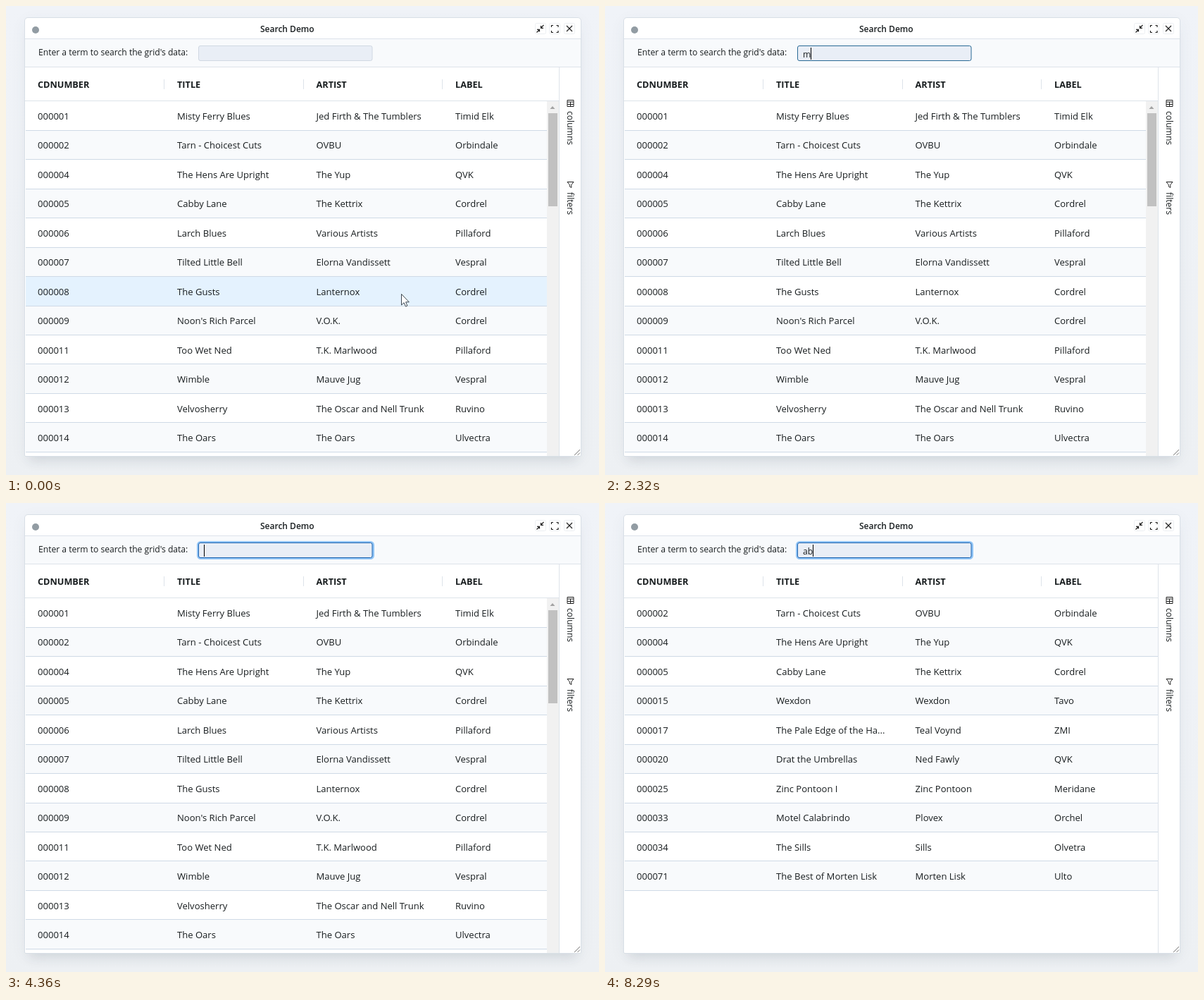
Write an HTML page that moves like this. It is 842 by 665 pixels and loops after 8370 ms.

```html
<!DOCTYPE html>
<html lang="en">
<head>
<meta charset="utf-8">
<title>Search Demo</title>
<style>
  html, body { margin: 0; width: 100%; height: 100%; overflow: hidden; }
  body { background: linear-gradient(#f0f3f8, #edf0f3); }
  .window {
    position: absolute; left: 26px; top: 16px; width: 789px; height: 621px;
    border: 1px solid #d8dfe6; border-radius: 5px 5px 2px 2px; background: #fff;
    box-shadow: 0 14px 14px -8px rgba(60, 75, 95, .11), 0 5px 22px rgba(60, 75, 95, .05);
  }
  svg { position: absolute; left: 0; top: 0; }
  text { font: 12.13px "Open Sans", "Noto Sans", sans-serif; fill: #181d1f; white-space: pre; }
  .title { font-weight: 600; font-size: 12px; }
  .head text { font-weight: 700; font-size: 12.7px; }
  #rows text { font-size: 13.05px; }
  .line { stroke: #dde3ea; fill: none; }
  .icon { stroke: #222; fill: none; stroke-width: 1.2; }
  .thin { stroke-width: 1; }
  .button { fill: #fff; stroke: #eceff2; }
</style>
</head>
<body>
<div class="window"></div>
<svg width="842" height="665" viewBox="0 0 842 665">
  <clipPath id="body"><rect x="27" y="135" width="758" height="503"/></clipPath>

  <rect x="27" y="47" width="789" height="39" fill="#f8fafc"/>
  <path class="line" d="M27 46.5H816M27 86.5H816M27 134.5H785M785.5 86V638"/>
  <circle cx="42" cy="34" r="5" fill="#929ca3"/>
  <text class="title" x="361" y="37">Search Demo</text>

  <rect class="button" x="751.5" y="24.5" width="15" height="15" rx="2"/>
  <rect class="button" x="771.5" y="24.5" width="15" height="15" rx="2"/>
  <rect class="button" x="792.5" y="24.5" width="15" height="15" rx="2"/>
  <path class="icon" d="M763.5 27 759.5 31M759.5 28V31.3H763M753.5 37.5 757.5 33.5M754 33.3H757.5V36.5"/>
  <path class="icon" d="M774.5 30V27.5H777M781.5 27.5H784V30M784 35V37.5H781.5M777 37.5H774.5V35"/>
  <path class="icon" d="M796 28 804 36M804 28 796 36"/>

  <text x="46" y="70">Enter a term to search the grid's data:</text>
  <rect id="ring" x="272.5" y="55.5" width="249" height="23" rx="4" fill="none" stroke="#92c5f6" stroke-width="3"/>
  <rect id="field" x="273.5" y="56.5" width="246.5" height="21" rx="2.5" fill="#e9eef6"/>
  <rect id="selection" x="281" y="59" height="18" fill="#1a73d8"/>
  <text id="term" x="281" y="73"></text>
  <rect id="caret" y="59" width="1" height="17"/>

  <g class="head">
    <text x="45" y="116">CDNUMBER</text>
    <text x="243" y="116">TITLE</text>
    <text x="440.5" y="116">ARTIST</text>
    <text x="638" y="116">LABEL</text>
    <path class="line" d="M224.5 104V118M422.5 104V118M619.5 104V118"/>
  </g>

  <g clip-path="url(#body)">
    <g id="rows"></g>
    <g id="scrollbar">
      <rect x="768" y="135" width="17" height="503" fill="#f1f1f1"/>
      <rect x="770" y="152" width="13" height="132" fill="#c1c1c1"/>
      <path d="M772.5 146 776 142 779.5 146Z" fill="#a3a3a3"/>
    </g>
  </g>

  <path class="icon thin" d="M797 133.5H806V142.5H797ZM797 136H806M797 139.5H806M801.5 136V142"/>
  <text transform="translate(797 149) rotate(90)">columns</text>
  <path class="icon thin" d="M797 249.5H806L802.8 253.5V257.5L800.3 256V253.5Z"/>
  <text transform="translate(797 264) rotate(90)">filters</text>
  <path class="icon thin" style="stroke:#777" d="M807 637 815 629M811.5 637 815 633.5"/>

  <path id="pointer" d="M0 0V15.5L3.6 12.2 6 17.6 8.4 16.5 6.1 11.3H10.8Z" fill="#fff" stroke="#3c4650"/>
</svg>

<script>
const LOOP = 8370, TOP = 134.9, PITCH = 41.45;
const COLUMNS = [45, 243, 440.5, 638];
const $ = id => document.getElementById(id);

const records = Object.fromEntries(`
000001|Misty Ferry Blues|Jed Firth & The Tumblers|Timid Elk
000002|Tarn - Choicest Cuts|OVBU|Orbindale
000004|The Hens Are Upright|The Yup|QVK
000005|Cabby Lane|The Kettrix|Cordrel
000006|Larch Blues|Various Artists|Pillaford
000007|Tilted Little Bell|Elorna Vandissett|Vespral
000008|The Gusts|Lanternox|Cordrel
000009|Noon's Rich Parcel|V.O.K.|Cordrel
000011|Too Wet Ned|T.K. Marlwood|Pillaford
000012|Wimble|Mauve Jug|Vespral
000013|Velvosherry|The Oscar and Nell Trunk|Ruvino
000014|The Oars|The Oars|Ulvectra
000015|Wexdon|Wexdon|Tavo
000017|The Pale Edge of the Ha...|Teal Voynd|ZMI
000020|Drat the Umbrellas|Ned Fawly|QVK
000021|Vermeil Mists|Dwain Corbley|Plumb Studios
000025|Zinc Pontoon I|Zinc Pontoon|Meridane
000033|Motel Calabrindo|Plovex|Orchel
000034|The Sills|Sills|Olvetra
000041|Wouldn't Trust the Lad...|Corbin Lee Tarvin|ZMI
000071|The Best of Morten Lisk|Morten Lisk|Ulto`
  .trim().split("\n").map(line => [+line.slice(0, 6), line.split("|")]));

const views = {
  all: [1, 2, 4, 5, 6, 7, 8, 9, 11, 12, 13, 14, 15],
  mi: [1, 17, 21, 41],
  mis: [1, 21],
  ab: [2, 4, 5, 15, 17, 20, 25, 33, 34, 71]
};

// Cue lists: [start in ms, ...values]; each cue holds until the next one.
const pointerCues = [
  [0, 561, 408], [90, 528, 402], [170, 472, 389], [250, 421, 373], [330, 377, 355],
  [400, 352, 322], [480, 337, 278], [560, 327, 230], [630, 320, 184], [710, 316, 145],
  [790, 314, 116], [860, 313, 94], [950, null, null]
];
const viewCues = [
  [0, "all"], [2550, "mi", [0, 1, 1, 0]], [2630, "mi"], [2880, "mis"], [4360, "all"], [6240, "ab"]
];
const termCues = [
  [0, ""], [2320, "m"], [2470, "mi"], [2790, "mis"], [4190, ""], [5760, "a"], [6170, "ab"]
];
const caretCues = [
  [0, false], [950, true], [1260, false], [1750, true], [3360, false], [4190, true],
  [4760, false], [5260, true], [6650, false], [7230, true], [7710, false], [8290, true]
];
const fieldCues = [[0, "#d0d8e2"], [950, "#7fa3c4"], [1030, "#2a6a96"], [2470, "#1b62ae"]];
const ringCues = [[0, 0], [2400, 0.5], [2470, 1]];

const cueAt = (cues, t) => cues.findLast(cue => cue[0] <= t).slice(1);
const show = (node, on) => node.setAttribute("visibility", on ? "visible" : "hidden");
const escapeText = s => s.replace(/&/g, "&amp;");
const edge = i => Math.floor(TOP + i * PITCH);

function rowMarkup(id, i, width, fill) {
  const top = edge(i) + 1, bottom = edge(i + 1);
  const baseline = Math.round(161 + i * PITCH);
  const cells = records[id].map((s, c) =>
    `<text x="${COLUMNS[c]}" y="${baseline}">${escapeText(s)}</text>`).join("");
  return `<rect x="28" y="${top}" width="${width}" height="${bottom - top}" fill="${fill}"/>
    <rect x="28" y="${bottom}" width="${width}" height="1" fill="#cfdae6"/>${cells}`;
}

let drawnRows = "";
function drawRows(view, stripes, hovered) {
  const key = [view, stripes, hovered].join();
  if (key === drawnRows) return;
  drawnRows = key;
  const full = view === "all";
  $("rows").innerHTML = views[view].map((id, i) => {
    const striped = stripes ? stripes[i] : i % 2;
    const fill = i === hovered ? "#e4f2fe" : striped ? "#f8fafc" : "#fff";
    return rowMarkup(id, i, full ? 740 : 757, fill);
  }).join("");
  show($("scrollbar"), full);
}

function drawField(t) {
  const [term] = cueAt(termCues, t);
  const selected = t >= 3850 && t < 4190;
  const node = $("term");
  if (node.textContent !== term) node.textContent = term;
  node.style.fill = selected ? "#fff" : "";
  const width = term ? Math.floor(node.getComputedTextLength()) : 0;
  $("selection").setAttribute("width", width);
  show($("selection"), selected);
  $("caret").setAttribute("x", 281 + width);
  show($("caret"), cueAt(caretCues, t)[0]);
  $("field").setAttribute("stroke", cueAt(fieldCues, t)[0]);
  $("ring").setAttribute("opacity", cueAt(ringCues, t)[0]);
}

function draw() {
  const t = performance.now() % LOOP;
  const [x, y] = cueAt(pointerCues, t);
  const visible = x !== null;
  show($("pointer"), visible);
  if (visible) $("pointer").setAttribute("transform", `translate(${x + 0.5} ${y + 0.5})`);
  const [view, stripes] = cueAt(viewCues, t);
  drawRows(view, stripes, visible ? Math.floor((y - TOP) / PITCH) : -1);
  drawField(t);
  requestAnimationFrame(draw);
}
draw();
</script>
</body>
</html>
```
